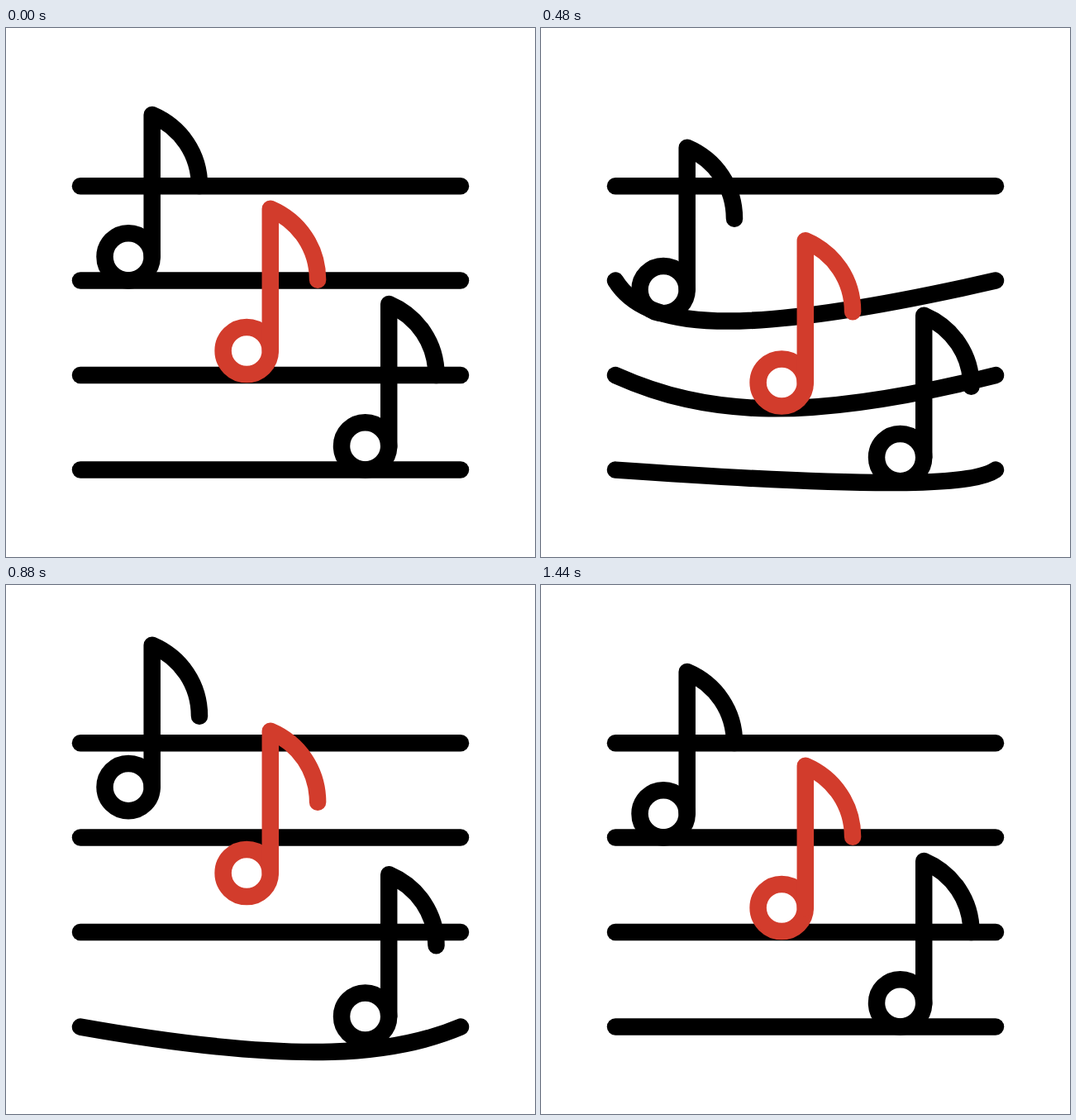
Write an HTML page that moves like this. It is 640x640 px and loops after 1640 ms.

```html
<!DOCTYPE html>
<html lang="en">
<head>
<meta charset="utf-8">
<title>Bouncing notes</title>
<style>
  html, body { margin: 0; width: 100%; height: 100%; overflow: hidden; background: #fff; }
  svg { display: block; width: 100vw; height: 100vh; }
  path, circle { fill: none; stroke-width: 20.5; stroke-linecap: round; stroke-linejoin: round; }
  .ink { stroke: #000; }
  .red { stroke: #d23c2c; }
</style>
</head>
<body>
<svg viewBox="0 0 640 640">
  <defs>
    <g id="note">
      <circle r="28.6"/>
      <path d="M28.6 0V-171.8C63.8 -156.8 85.9 -123.8 85.9 -85.8"/>
    </g>
  </defs>
  <g class="ink">
    <path d="M90 191.2H550"/>
    <path class="string"/>
    <path class="string"/>
    <path class="string"/>
  </g>
  <use class="note ink" href="#note"/>
  <use class="note ink" href="#note"/>
  <use class="note red" href="#note"/>
</svg>
<script>
const LOOP = 1640, STEP = 40, LEFT = 90, WIDTH = 460;

// keys: [time, offset] pairs, eased between neighbours
const notes = [
  { x: 148.1, y: 276.8, keys: [[0, 0], [422, 47.5], [752, -47.5], [1090, 0]] },
  { x: 434.6, y: 505.8, keys: [[320, 0], [761, 46], [1076, -47], [1416, 0]] },
  { x: 291.2, y: 390.5, keys: [[158, 0], [600, 47], [920, -46], [1245, 0]] }
];

// bend: control points at full pull, relative to the left end
const strings = [
  { y: 305.6, bend: [[18, 66], [114, 84]], keys: [[0, 0], [380, 1], [820, 0]] },
  { y: 420.1, bend: [[111, 57.5], [230, 66.5]], keys: [[116, 0], [590, 1], [838, 0]] },
  { y: 534.6, bend: [[350, 80], [436, 53]], keys: [[315, 0], [762, 1], [1036, 0]] }
];

const noteEls = document.querySelectorAll('.note');
const stringEls = document.querySelectorAll('.string');
const mix = (a, b, k) => a + (b - a) * k;
const smooth = u => u * u * (3 - 2 * u);

function valueAt(keys, t) {
  if (t <= keys[0][0]) return keys[0][1];
  for (let i = 1; i < keys.length; i++) {
    const [t0, v0] = keys[i - 1], [t1, v1] = keys[i];
    if (t < t1) return mix(v0, v1, smooth((t - t0) / (t1 - t0)));
  }
  return keys[keys.length - 1][1];
}

function stringPath({ y, bend, keys }, t) {
  const pull = valueAt(keys, t);
  // Pulled from the note's spot, then relaxes evenly along its length
  const spread = t > keys[1][0] ? pull : 1;
  const points = bend.map(([bx, by], i) =>
    `${LEFT + mix(WIDTH * (i + 1) / 3, bx, spread)} ${y + by * pull}`);
  return `M${LEFT} ${y}C${points.join(' ')} ${LEFT + WIDTH} ${y}`;
}

function draw(t) {
  notes.forEach((n, i) =>
    noteEls[i].setAttribute('transform', `translate(${n.x} ${n.y + valueAt(n.keys, t)})`));
  strings.forEach((s, i) => stringEls[i].setAttribute('d', stringPath(s, t)));
}

const start = performance.now();
function tick() {
  const t = (performance.now() - start) % LOOP;
  draw(Math.floor(t / STEP) * STEP);
  requestAnimationFrame(tick);
}
tick();
</script>
</body>
</html>
```
